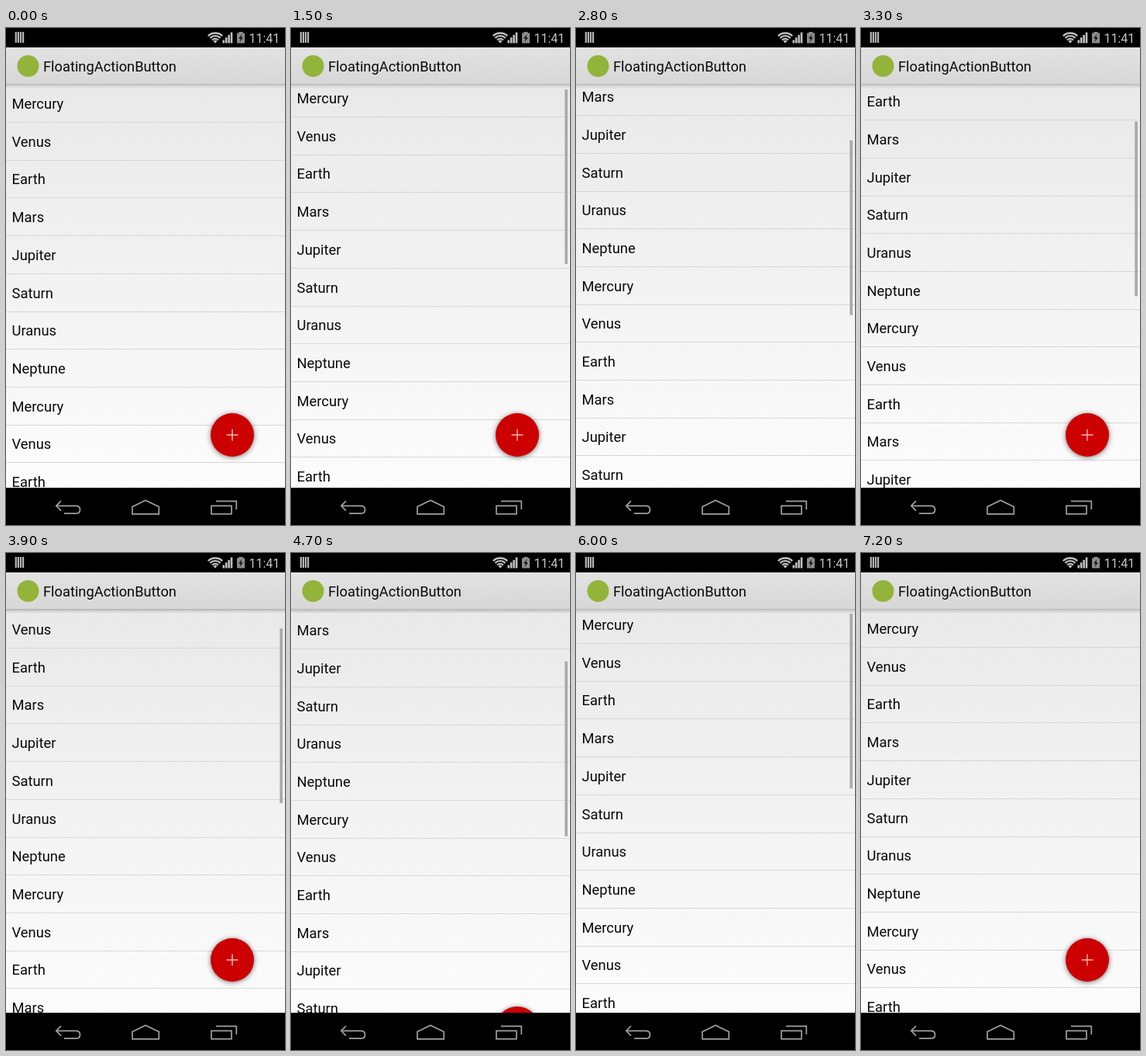
An HTML page with a canvas that plays this animation: 360x640 px, repeating every 7.7 s.

```html
<!DOCTYPE html>
<html lang="en">
<head>
<meta charset="utf-8">
<title>FloatingActionButton</title>
<style>
html, body { margin: 0; width: 100%; height: 100%; overflow: hidden; background: #000; }
canvas { display: block; width: 360px; height: 640px; }
</style>
</head>
<body>
<canvas id="stage"></canvas>
<script>
const W = 360, H = 640, LOOP = 7700, STEP = 100;
const BAR_TOP = 25, LIST_TOP = 73, NAV_TOP = 592, ROW = 48.7, ROWS = 24;
const FONT = 'Roboto, "Noto Sans", sans-serif';
const PLANETS = ['Mercury', 'Venus', 'Earth', 'Mars', 'Jupiter', 'Saturn', 'Uranus', 'Neptune'];

// [time, scroll offset]
const SCROLL = [
  [0, 0], [1400, 0], [1500, 7], [1700, 40], [2000, 105], [2400, 152], [2600, 157],
  [2800, 155], [3000, 146], [3400, 85], [3700, 53], [3900, 47.7], [4200, 47.7],
  [4400, 62], [4550, 97], [4700, 144], [5000, 250], [5400, 345], [5550, 352],
  [5750, 290], [5900, 80], [6000, 5], [6200, 0], [LOOP, 0]
];
// [hide start, show start]
const HIDES = [[1750, 3000], [4550, 6000]];
const FAB_TIME = 200, FAB_DROP = 103;

const canvas = document.getElementById('stage');
const ctx = canvas.getContext('2d');
const dpr = window.devicePixelRatio || 1;
canvas.width = W * dpr;
canvas.height = H * dpr;
ctx.scale(dpr, dpr);

const clamp = v => Math.min(1, Math.max(0, v));
const ease = p => (1 - Math.cos(Math.PI * clamp(p))) / 2;

function slope(i) {
  const a = SCROLL[i - 1], b = SCROLL[i], c = SCROLL[i + 1];
  if (!a || !c) return 0;
  const l = (b[1] - a[1]) / (b[0] - a[0]), r = (c[1] - b[1]) / (c[0] - b[0]);
  return l * r > 0 ? 2 * l * r / (l + r) : 0;
}

// Monotone cubic through the scroll keys
function scrollAt(t) {
  let i = 0;
  while (i < SCROLL.length - 2 && SCROLL[i + 1][0] <= t) i++;
  const [t0, a] = SCROLL[i], [t1, b] = SCROLL[i + 1];
  const d = t1 - t0, p = (t - t0) / d, q = 1 - p;
  return a * (1 + 2 * p) * q * q + b * p * p * (3 - 2 * p) +
    d * p * q * (slope(i) * q - slope(i + 1) * p);
}

function fabDrop(t) {
  return FAB_DROP * HIDES.reduce((sum, [hide, show]) =>
    sum + ease((t - hide) / FAB_TIME) - ease((t - show) / FAB_TIME), 0);
}

function barAlpha(t) {
  return t < 1500 ? 0 : 1 - clamp((t - 6700) / 300);
}

function box(color, x, y, w, h) {
  ctx.fillStyle = color;
  ctx.fillRect(x, y, w, h);
}

function shade(y0, y1, from, to) {
  const g = ctx.createLinearGradient(0, y0, 0, y1);
  g.addColorStop(0, from);
  g.addColorStop(1, to);
  box(g, 0, y0, W, y1 - y0);
}

function label(text, x, y, size, color) {
  ctx.font = size + 'px ' + FONT;
  ctx.fillStyle = color;
  ctx.fillText(text, x, y);
}

function trace(points, close) {
  ctx.beginPath();
  points.forEach(([x, y]) => ctx.lineTo(x, y));
  if (close) ctx.closePath();
}

function disc(color, x, y, r) {
  ctx.fillStyle = color;
  ctx.beginPath();
  ctx.arc(x, y, r, 0, 2 * Math.PI);
  ctx.fill();
}

function drawList(scroll) {
  ctx.save();
  ctx.beginPath();
  ctx.rect(0, LIST_TOP, W, NAV_TOP - LIST_TOP);
  ctx.clip();
  for (let i = 0; i < ROWS; i++) {
    const y = i * ROW - scroll;
    if (y > NAV_TOP || y < -ROW) continue;
    label(PLANETS[i % PLANETS.length], 7.5, Math.round(y + 104), 18.4, '#0a0a0a');
    box('#d7d7d8', 0, Math.round(y + 121), W, 1);
  }
  ctx.restore();
}

function drawFab(drop) {
  const x = 292, y = 524 + drop;
  ctx.save();
  ctx.shadowColor = 'rgba(0,0,0,0.55)';
  ctx.shadowBlur = 6 * dpr;
  ctx.shadowOffsetY = dpr;
  disc('#cc0000', x, y, 28);
  ctx.restore();
  box('#f6dcdc', x - 7.5, y - 0.6, 15, 1.2);
  box('#f6dcdc', x - 0.6, y - 7.5, 1.2, 15);
}

function drawActionBar() {
  shade(BAR_TOP, LIST_TOP, '#e2e2e2', '#d7d7d7');
  box('#b8b8b8', 0, LIST_TOP - 1, W, 1);
  shade(LIST_TOP, LIST_TOP + 5, 'rgba(0,0,0,0.14)', 'rgba(0,0,0,0)');
  disc('#93b43a', 28.5, 49, 14);
  label('FloatingActionButton', 48, 56, 18.3, '#0a0a0a');
}

function drawStatus() {
  const tint = '#bebebe';
  box('#000', 0, 0, W, BAR_TOP);
  for (let i = 0; i < 4; i++) box('#b4b4b4', 11.7 + i * 3.1, 5, 2.2, 14);

  // Wi-Fi
  ctx.strokeStyle = tint;
  ctx.lineWidth = 2.3;
  for (const r of [5.6, 9.3, 13]) {
    ctx.beginPath();
    ctx.arc(270, 19.5, r, -Math.PI * 0.75, -Math.PI * 0.25);
    ctx.stroke();
  }
  ctx.fillStyle = tint;
  trace([[270, 19.8], [267.4, 16.8], [270, 15.6], [272.6, 16.8]], true);
  ctx.fill();

  // Signal
  for (let i = 0; i < 4; i++) {
    const h = 4 + i * 3.3;
    box(tint, 279.5 + i * 3.4, 19.5 - h, 2.6, h);
  }

  // Battery
  box('#8c8c8c', 300.5, 5, 5, 2);
  box('#8c8c8c', 298, 6.5, 10, 13);
  ctx.fillStyle = '#111';
  trace([[304.5, 8], [300, 13.6], [302.7, 13.6], [301.5, 18], [306, 12.2], [303.3, 12.2]], true);
  ctx.fill();

  label('11:41', 313.5, 19, 16, '#c4c4c4');
}

function drawNav() {
  box('#000', 0, NAV_TOP, W, H - NAV_TOP);
  ctx.strokeStyle = '#a0a0a0';
  ctx.lineWidth = 1.7;

  // Back
  trace([[71, 609], [64.8, 615.3], [71, 621.6]]);
  ctx.stroke();
  ctx.beginPath();
  ctx.moveTo(65, 615.3);
  ctx.lineTo(90, 615.3);
  ctx.quadraticCurveTo(95.5, 615.3, 95.5, 620.2);
  ctx.quadraticCurveTo(95.5, 625.2, 90, 625.2);
  ctx.lineTo(75, 625.2);
  ctx.stroke();

  // Home
  trace([[163, 616.5], [180, 608.3], [197.3, 616.5], [197.3, 625.8], [163, 625.8]], true);
  ctx.stroke();

  // Recents
  ctx.strokeRect(265, 615.3, 26, 10.5);
  trace([[271, 609.3], [297.3, 609.3], [297.3, 620]]);
  ctx.stroke();
}

function draw(t) {
  const scroll = scrollAt(t);
  shade(LIST_TOP, NAV_TOP, '#e9e9ea', '#fdfcfd');
  drawList(scroll);
  ctx.globalAlpha = barAlpha(t);
  box('#a9a9a9', 353.3, 76 + scroll * 0.443, 3.6, 225);
  ctx.globalAlpha = 1;
  drawFab(fabDrop(t));
  drawActionBar();
  drawStatus();
  drawNav();
}

const start = performance.now();
function tick() {
  const t = (performance.now() - start) % LOOP;
  draw(Math.floor(t / STEP) * STEP);
  requestAnimationFrame(tick);
}
tick();
</script>
</body>
</html>
```
